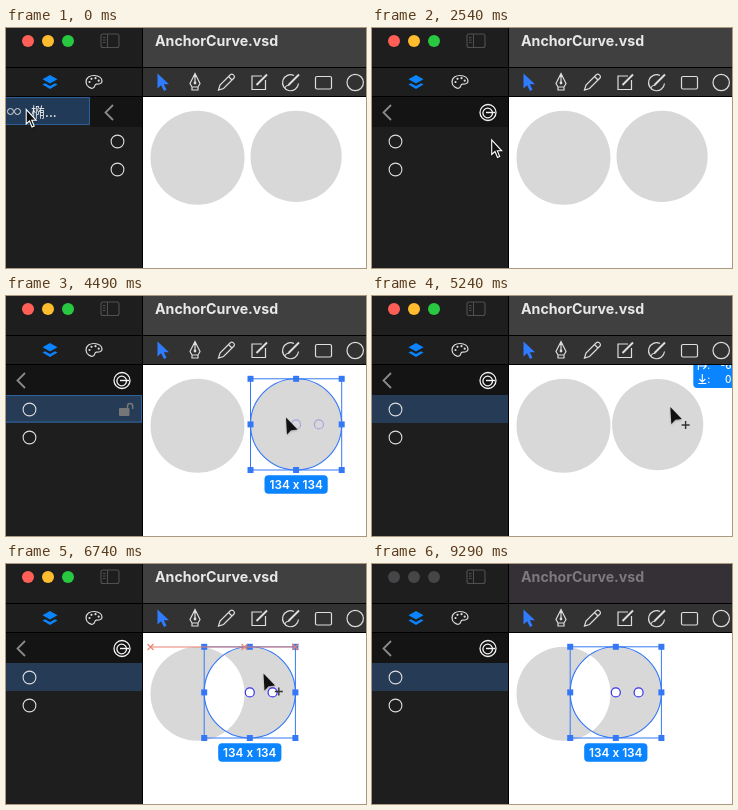
Recreate the animation shown at these times as an HTML page with a canvas. Size 360 by 240 pixels, loop 9310 ms.

```html
<!DOCTYPE html>
<html lang="en">
<head>
<meta charset="utf-8">
<title>Shape editor</title>
<style>
html, body { margin: 0; width: 100%; height: 100%; overflow: hidden; background: #fff; }
canvas { display: block; width: 360px; height: 240px; }
</style>
</head>
<body>
<canvas></canvas>
<script>
const LOOP = 9310;
const UI = 'Inter, Roboto, sans-serif';
const BLUE = '#0a84ff', SELECT = '#3478f6', ICON = '#dedede', GUIDE = '#e8806f';
const R = 45.6, PX = 134 / (2 * R), HOME = { x: 290.1, y: 128.4 };
const canvas = document.querySelector('canvas');
const c = canvas.getContext('2d');
const dpr = window.devicePixelRatio || 1;
canvas.width = 360 * dpr;
canvas.height = 240 * dpr;

// [time, x, y]
const pointerPath = [
  [0, 19.5, 81.5], [150, 21, 82], [1050, 109, 82], [1200, 110.5, 82.5], [2240, 110.5, 82.5],
  [2540, 119, 112], [2690, 119, 112], [3140, 122, 113], [3740, 280, 121.5], [4490, 280, 121.5],
  [4940, 303, 111], [5090, 303, 111], [5690, 273, 111], [6140, 257.5, 109.5],
  [6740, 257.5, 109.5], [7640, 317, 226]
];
const dragPath = [[5090, HOME.x, HOME.y], [5690, 261.8, 129.3], [6140, 243.8, HOME.y]];

function along(path, t) {
  if (t <= path[0][0]) return { x: path[0][1], y: path[0][2] };
  for (let i = 1; i < path.length; i++) {
    const [t0, x0, y0] = path[i - 1], [t1, x1, y1] = path[i];
    if (t <= t1) {
      const u = (t - t0) / (t1 - t0), e = u * u * (3 - 2 * u);
      return { x: x0 + (x1 - x0) * e, y: y0 + (y1 - y0) * e };
    }
  }
  const [, x, y] = path[path.length - 1];
  return { x, y };
}

function paint(fill, stroke, width = 1) {
  if (fill) { c.fillStyle = fill; c.fill(); }
  if (stroke) { c.strokeStyle = stroke; c.lineWidth = width; c.stroke(); }
}
function box(x, y, w, h, fill, stroke, radius = 0, width = 1) {
  c.beginPath(); c.roundRect(x, y, w, h, radius); paint(fill, stroke, width);
}
function disc(x, y, r, fill, stroke, width = 1) {
  c.beginPath(); c.arc(x, y, r, 0, 7); paint(fill, stroke, width);
}
function shape(d, x, y, fill, stroke, width = 1) {
  const path = new Path2D(d);
  c.save(); c.translate(x, y);
  if (fill) { c.fillStyle = fill; c.fill(path); }
  if (stroke) { c.strokeStyle = stroke; c.lineWidth = width; c.stroke(path); }
  c.restore();
}
function text(str, x, y, font, color, align = 'left') {
  c.font = font; c.fillStyle = color; c.textAlign = align; c.fillText(str, x, y);
}
function clipped(x, y, w, h, draw) {
  c.save(); c.beginPath(); c.rect(x, y, w, h); c.clip(); draw(); c.restore();
}

function drawTitleBar(active) {
  box(0, 0, 137, 240, '#1e1e1e');
  box(137, 0, 223, 39, active ? '#404041' : '#343036');
  box(137, 40, 223, 29, '#323233');
  ['#ff5f57', '#febc2e', '#28c840'].forEach((color, i) =>
    disc(22 + 20 * i, 13, 6, active ? color : '#464648'));
  box(95, 6, 18, 13.5, null, '#505050', 2, 1.1);
  shape('M6.5 0V13M2 3.5H4.5M2 6H4.5M2 8.5H4.5', 95, 6, null, '#505050');
  text('AnchorCurve.vsd', 149, 18, '700 14.2px ' + UI, active ? '#e8e8e8' : '#7c7a7e');
  box(0, 39, 360, 1, '#000');
  box(0, 68, 360, 1, '#000');
}

function drawToolbar() {
  shape('M0 -7L7.5 -2.7L0 1.6L-7.5 -2.7Z', 44, 54, BLUE);
  shape('M-7.5 2.6L-5 1.2L0 4L5 1.2L7.5 2.6L0 7Z', 44, 54, BLUE);
  shape('M-1 6C-3 7 -8 4.5 -8 0C-8 -4.5 -4 -6.5 0 -6.5C5 -6.5 8 -4 8 -1C8 2 5 2.2 2.5 2.2C0 2.2 1.5 5 -1 6Z', 88, 54, null, ICON, 1.2);
  [[-4.5, 0], [-2.5, -3.2], [1.5, -3.8], [4.7, -1.3]].forEach(([x, y]) => disc(88 + x, 54 + y, 1.1, ICON));

  shape('M0 0V15L3.6 11.7L6.5 17.5L9 16.3L6.3 10.7H11.5Z', 151.5, 45.5, '#2f7cff');
  shape('M0 -8.5L5 1.5L3 5H-3L-5 1.5ZM0 -8.5V0M-3 8H3V5H-3Z', 189, 54, null, ICON, 1.2);
  disc(189, 55, 1.4, ICON);
  shape('M-8 8L-6.5 3L4 -7.5Q6 -8.5 7.5 -6.5Q8.5 -5 7.5 -4L-3 6.5ZM2 -5.5L5.5 -2', 220.5, 54, null, ICON, 1.2);
  shape('M3 -6H-7V7.5H6.5V-2', 253, 54, null, ICON, 1.2);
  shape('M-2.5 3L8 -7.5', 253, 54, null, ICON, 2);
  shape('M3 -7A8 8 0 1 0 7.5 1M-6 5Q-4 2 -2 3', 285, 54.5, null, ICON, 1.2);
  shape('M-2.5 3L8 -7.5', 285, 54, null, ICON, 2);
  box(309.5, 48.5, 16, 12.5, null, ICON, 1.5, 1.2);
  disc(349.2, 54.5, 8.2, null, ICON, 1.2);
}

function drawSidebar(t, selected, hovered) {
  const x = 88 * Math.max(0, 1 - t / 300) ** 2;
  clipped(0, 69, 136, 171, () => {
    if (x > 0) {
      box(x - 141, 69.5, 136.5, 27, '#203a58', '#2d5f95');
      disc(x - 83.5, 83.5, 3, null, ICON);
      disc(x - 76.5, 83.5, 3, null, ICON);
      text('椭...', x - 63, 88.5, '14px "Noto Sans CJK SC", "Noto Sans CJK", sans-serif', '#eee');
    }
    box(x - 4, 69, 141, 30, '#141414');
    shape('M4.5 -7.5L-3 0L4.5 7.5', x + 14.5, 84.5, null, '#8a8a8a', 1.8);
    const pressed = t >= 1490 && t < 1640;
    if (pressed) box(104, 72, 24, 24, '#4b4b4c', null, 5);
    const tone = pressed ? '#c8c8c8' : '#f4f4f4';
    disc(x + 116, 84.5, 8, null, tone, 1.3);
    disc(x + 115.7, 85, 4.8, null, tone, 1.3);
    shape('M-2 0H7', x + 116, 84.5, null, tone, 1.4);

    if (selected) box(0, 99, 136, 28, '#263c56');
    if (hovered) {
      box(-1, 99.5, 136.5, 26.5, null, '#2d6199');
      box(113, 112, 10.5, 8, '#747678', null, 1);
      shape('M121.5 112V110A2.6 2.6 0 0 1 126.7 110V113', 0, 0, null, '#747678', 1.5);
    }
    disc(x + 23.5, 113.5, 6.4, null, ICON, 1.1);
    disc(x + 23.5, 141.5, 6.4, null, ICON, 1.1);
  });
  box(136, 0, 1, 240, '#000');
}

function drawSelection(p, dotAlpha) {
  disc(p.x, p.y, R, null, SELECT, 1.1);
  box(p.x - R, p.y - R, 2 * R, 2 * R, null, SELECT);
  for (const i of [-1, 0, 1])
    for (const j of [-1, 0, 1])
      if (i || j) box(p.x + i * R - 3, p.y + j * R - 3, 6, 6, SELECT);
  c.globalAlpha = dotAlpha;
  for (const dx of [0, 22.8]) disc(p.x + dx, p.y, 4.5, dotAlpha === 1 ? '#fff' : null, '#3232f0', 1.2);
  c.globalAlpha = 1;
  box(p.x - 31.6, 179.3, 63.2, 18.4, BLUE, null, 4);
  text('134 x 134', p.x, 192.8, '600 11.8px ' + UI, '#fff', 'center');
}

function drawGuide(y, end) {
  shape(`M144.5 ${y}H${end}`, 0, 0, null, GUIDE);
  for (const x of [144.5, 238.5, end]) shape('M-3 -3L3 3M3 -3L-3 3', x, y, null, GUIDE, 1.1);
}

function drawReadout(tip, p) {
  const x = tip.x + 23, y = tip.y - 19;
  box(x, y - 34, 68, 34, BLUE, null, 4);
  const font = '500 10px ' + UI;
  const row = (value, base) => {
    text(Math.round(value * PX) + ' Pixel', x + 63.5, base, font, '#fff', 'right');
    text(':', x + 14, base, font, '#fff');
  };
  row(p.x - HOME.x, y - 19);
  row(p.y - HOME.y, y - 5);
  shape('M5 -26V-18M6 -22H13M10 -25L13 -22L10 -19', x, y, null, '#fff', 1.1);
  shape('M9 -14V-6M6 -9L9 -6L12 -9M5 -4.5H13', x, y, null, '#fff', 1.1);
}

function drawPointer(tip, overShape, copying) {
  c.save();
  c.shadowColor = '#0004'; c.shadowBlur = 2; c.shadowOffsetY = 1;
  if (overShape) shape('M0 0L1 17L5 12.7L11.5 12Z', tip.x, tip.y, '#111');
  else shape('M0 0V14.5L3.3 11.5L5.8 17.5L8 16.5L5.6 10.8H10Z', tip.x + .7, tip.y, '#111', '#fff', 1.1);
  c.restore();
  if (copying) shape('M-4 0H4M0 -4V4', tip.x + 15.3, tip.y + 18, null, '#333', 1.4);
}

function draw(time) {
  // The picture advances in steps of 150 ms, with one longer hold before 1490.
  const t = time < 1490 ? Math.floor(time / 150) * 150 : 1490 + Math.floor((time - 1490) / 150) * 150;
  const tip = along(pointerPath, t), p = along(dragPath, t);
  const dragging = t >= 5240 && t < 6740;
  const copying = t >= 5240 && t < 6890;
  const overShape = t >= 3140 && Math.hypot(tip.x - p.x, tip.y - p.y) < R;
  const hovered = overShape && !copying;
  const selected = t >= 4490;

  c.setTransform(dpr, 0, 0, dpr, 0, 0);
  box(0, 0, 360, 240, '#fff');
  c.beginPath();
  c.arc(191.5, 129.8, 47, 0, 2 * Math.PI);
  c.closePath();
  c.moveTo(p.x + R, p.y);
  c.arc(p.x, p.y, R, 0, 2 * Math.PI);
  c.fillStyle = '#d8d8d8';
  c.fill('evenodd');

  clipped(137, 69, 223, 171, () => {
    if (t >= 5540 && t < 5990) drawGuide(129.5, p.x);
    if (hovered && !selected) disc(p.x, p.y, R, null, SELECT, 1.6);
    if (selected && !dragging) drawSelection(p, t < 4640 ? .3 : 1);
    if (t >= 5990 && t < 6890) drawGuide(83, p.x + R);
    if (dragging) drawReadout(tip, p);
  });

  drawTitleBar(t < 9290);
  drawToolbar();
  drawSidebar(t, selected, hovered);
  if (t < 7790) drawPointer(tip, overShape, copying);
}

function tick() {
  draw(performance.now() % LOOP);
  requestAnimationFrame(tick);
}
tick();
</script>
</body>
</html>
```
